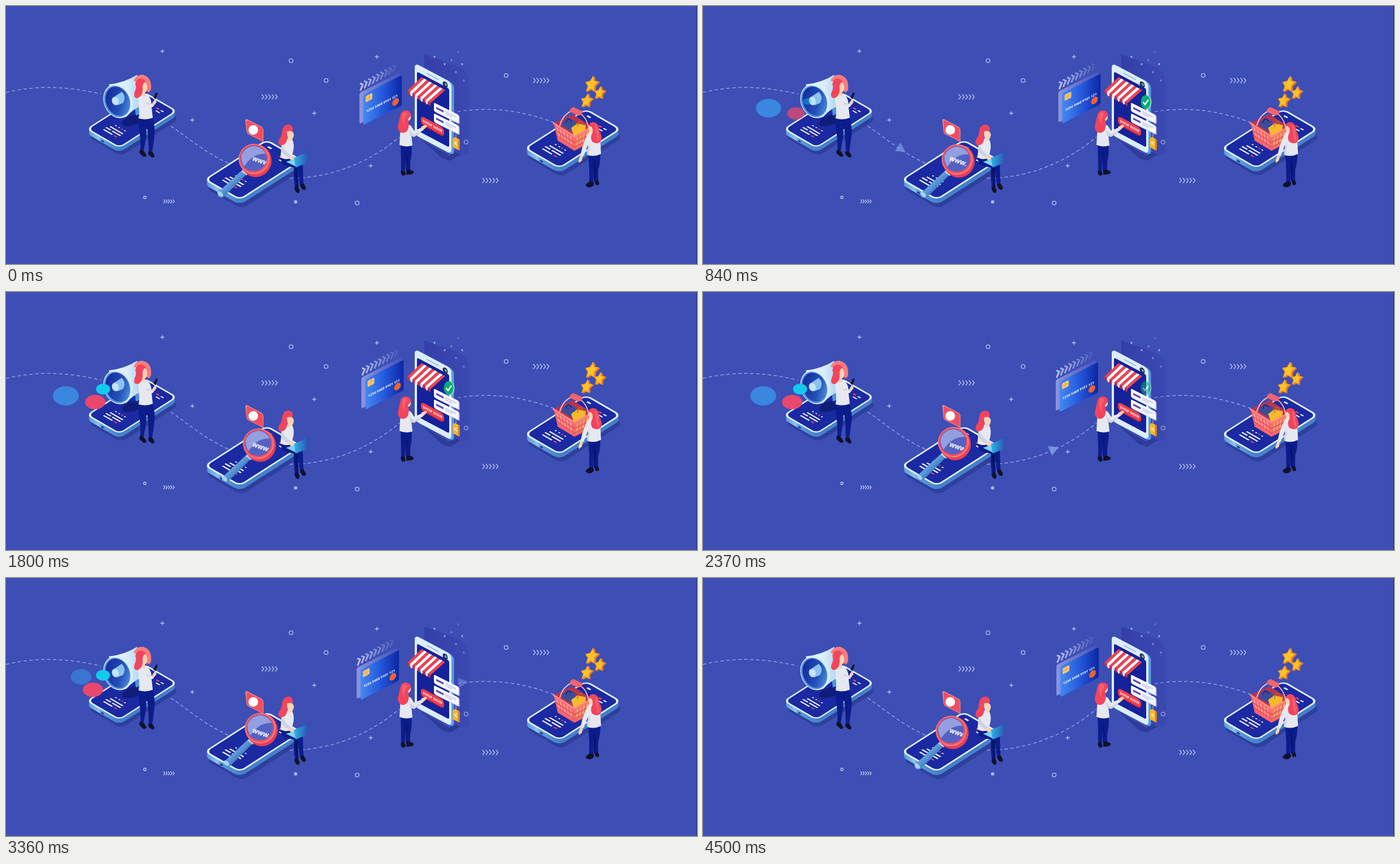
An HTML page for the animation above (4530 ms loop, 1224 by 457 pixels).

```html
<!DOCTYPE html>
<html lang="en">
<head>
<meta charset="utf-8">
<title>Online shopping journey</title>
<style>
html, body { margin: 0; width: 100%; height: 100%; overflow: hidden; background: #3d4eb5; }
svg { display: block; width: 100vw; height: 100vh; }
text { font-family: "Open Sans", Inter, sans-serif; font-weight: 700; fill: #fff; }
.hair { fill: #f2455d; }
.glow { fill: #f97c7c; }
.skin { fill: #fcd3b3; }
.shirt { fill: #e6e8ef; }
.fold { fill: #cfd3e2; }
.jeans { fill: #0b1c8c; }
.dim { fill: #081568; }
.shoe { fill: #10122b; }
.anim { animation: 4530ms linear infinite; }

.lens { animation-name: lens; animation-timing-function: ease-in-out; }
@keyframes lens {
  0%, 100% { transform: translate(0, 0); }
  24% { transform: translate(12px, 1px); }
  54% { transform: translate(4px, -5px); }
  76% { transform: translate(11px, -5px); }
}
.pay { animation-name: pay; animation-timing-function: ease-in-out; }
@keyframes pay {
  0%, 100% { transform: translate(0, 0); }
  29.5% { transform: translate(4.8px, -3.6px); }
  70% { transform: translate(-5px, 5.4px); }
}
.tick { animation-name: tick; }
@keyframes tick {
  0%, 9% { opacity: 0; }
  14%, 49.5% { opacity: 1; }
  56%, 100% { opacity: 0; }
}
.coin { animation-timing-function: ease-in-out; }
.c1 { animation-name: c1; }
.c2 { animation-name: c2; }
.c3 { animation-name: c3; }
@keyframes c1 {
  0%, 4% { transform: translate(190px, 169px) scale(.2); opacity: 0; animation-timing-function: ease-out; }
  11.3% { transform: translate(100px, 186px) scale(1); opacity: 1; }
  18.5% { transform: translate(116px, 181px) scale(.97); opacity: 1; }
  27% { transform: translate(105px, 184.5px) scale(1); }
  40% { transform: translate(106px, 184px) scale(1); }
  62% { transform: translate(107px, 184px) scale(1); opacity: 1; animation-timing-function: ease-in; }
  74.2% { transform: translate(133px, 175px) scale(.8); opacity: .7; animation-timing-function: linear; }
  79%, 100% { transform: translate(180px, 169px) scale(.3); opacity: 0; }
}
@keyframes c2 {
  0%, 15% { transform: translate(188px, 172px) scale(.3); opacity: 0; animation-timing-function: linear; }
  18.5% { transform: translate(165px, 190px) scale(.85); opacity: .75; animation-timing-function: ease-out; }
  22% { transform: translate(152px, 199px) scale(1); opacity: 1; }
  28% { transform: translate(160px, 193.5px) scale(1); }
  40%, 69% { transform: translate(158px, 195px) scale(1); }
  74.2% { transform: translate(154px, 198px) scale(1); opacity: 1; animation-timing-function: ease-in; }
  81%, 100% { transform: translate(186px, 171px) scale(.3); opacity: 0; }
}
@keyframes c3 {
  0%, 17% { transform: translate(190px, 168px) scale(.3); opacity: 0; animation-timing-function: linear; }
  18.5% { transform: translate(185px, 169px) scale(.6); opacity: .4; animation-timing-function: ease-out; }
  24% { transform: translate(168px, 174px) scale(1); opacity: 1; }
  31% { transform: translate(173px, 171.5px) scale(1); }
  40%, 73% { transform: translate(172px, 172px) scale(1); }
  78% { transform: translate(170px, 174px) scale(1); opacity: 1; animation-timing-function: ease-in; }
  89%, 100% { transform: translate(189px, 169px) scale(.4); opacity: 0; }
}
.arrow { fill: #7ea0e8; opacity: 0; offset-rotate: auto; }
.a1 { offset-path: path("M283 207C320 230 345 256 395 279"); animation-name: a1; }
.a2 { offset-path: path("M492 305C570 307 640 280 697 232"); animation-name: a2; }
.a3 { offset-path: path("M800 187C860 178 915 185 972 207"); animation-name: a3; }
@keyframes a1 {
  0%, 9.7% { offset-distance: 0%; opacity: 0; }
  13% { opacity: .85; }
  18% { opacity: .75; }
  24.1%, 100% { offset-distance: 100%; opacity: 0; }
}
@keyframes a2 {
  0%, 39.2% { offset-distance: 0%; opacity: 0; }
  43% { opacity: .85; }
  56% { opacity: .85; }
  61.2%, 100% { offset-distance: 100%; opacity: 0; }
}
@keyframes a3 {
  0%, 73.2% { offset-distance: 0%; opacity: 0; }
  75% { opacity: .85; }
  88.5% { opacity: .85; }
  93.6%, 100% { offset-distance: 100%; opacity: 0; }
}
</style>
</head>
<body>
<svg viewBox="0 0 1224 457" preserveAspectRatio="none">
<defs>
  <linearGradient id="edge"><stop offset="0" stop-color="#4b8fd6"/><stop offset=".36" stop-color="#8cc4ee"/><stop offset=".45" stop-color="#5c9fdf"/><stop offset="1" stop-color="#447fcb"/></linearGradient>
  <linearGradient id="cone"><stop offset="0" stop-color="#f1f9ff"/><stop offset=".55" stop-color="#d9edfb"/><stop offset="1" stop-color="#a9d2f1"/></linearGradient>
  <linearGradient id="mouth" x2="1" y2="1"><stop offset=".1" stop-color="#14289a"/><stop offset=".6" stop-color="#2450b8"/><stop offset="1" stop-color="#5fa3e6"/></linearGradient>
  <linearGradient id="bank"><stop offset="0" stop-color="#4489f2"/><stop offset=".5" stop-color="#2559dc"/><stop offset="1" stop-color="#0c26a4"/></linearGradient>
  <linearGradient id="ghost"><stop offset="0" stop-color="#a3a7ea" stop-opacity=".8"/><stop offset="1" stop-color="#8f93e0" stop-opacity=".1"/></linearGradient>
  <linearGradient id="pad"><stop offset="0" stop-color="#2d2f9c" stop-opacity=".5"/><stop offset="1" stop-color="#3436a4" stop-opacity=".2"/></linearGradient>
  <linearGradient id="laptop" x2="1"><stop offset="0" stop-color="#2fb4e6"/><stop offset="1" stop-color="#2a48ac"/></linearGradient>
  <linearGradient id="grip" x2="1" y2="1"><stop offset=".3" stop-color="#7fb8ea"/><stop offset=".6" stop-color="#3f7fc6"/></linearGradient>
  <clipPath id="glass"><ellipse class="anim lens" cx="439" cy="270" rx="23" ry="22.5"/></clipPath>
  <rect id="slab" width="60" height="110" rx="9" transform="matrix(.983 .567 .936 -.6 0 0)"/>
  <g id="phone">
    <use href="#slab" y="14" x="3" fill="#2f3f9c"/>
    <g fill="url(#edge)"><use href="#slab" y="7.5"/><use href="#slab" y="5.5"/><use href="#slab" y="3.5"/><use href="#slab" y="1.5"/></g>
    <use href="#slab" fill="#e4f3fd"/>
    <g transform="matrix(.983 .567 .936 -.6 0 0)">
      <rect x="2.400" y="2.600" width="55.200" height="104.800" rx="7" fill="#1b2aa2"/>
      <path d="M22 32h2.500M28 32h2.500M38 32h2.500" stroke="#fff" stroke-width="1.600"/>
      <path d="M33 32h2.500M36 15h5" stroke="#f2455d" stroke-width="1.900"/>
      <path d="M19 25.500h23M16 20.500h9M27.500 20.500h15M17 15h16" stroke="#f3f6ff" stroke-width="2.100"/>
      <path d="M35 96h5" stroke="#f2455d" stroke-width="2.400"/><path d="M43 96h5M39 91h7" stroke="#fff" stroke-width="1.800"/>
      <path d="M11 100.500h6" stroke="#e4f3fd" stroke-width="2.600"/>
    </g>
    <ellipse cx="29" cy="21.500" rx="3" ry="1.400" transform="rotate(30 29 21.500)" fill="#1b3a90"/>
  </g>
  <path id="tri" d="M10-1-7-10-7 8Z"/>
</defs>

<rect width="1224" height="457" fill="#3d4eb5"/>

<g fill="none" stroke="#909ee2" stroke-width="1.500" stroke-dasharray="6 4.500">
  <path d="M0 153C55 140 110 142 168 156"/>
  <path d="M283 207C320 230 345 256 395 279"/>
  <path d="M492 305C570 307 640 280 697 232"/>
  <path d="M800 187C860 178 915 185 972 207"/>
</g>
<g id="deco" fill="none" stroke="#b7c0ee" stroke-width="1.400"></g>
<circle cx="513" cy="347" r="3" fill="#a9b4ea"/>

<use href="#tri" class="anim arrow a1"/>
<use href="#tri" class="anim arrow a2"/>

<!-- megaphone scene -->
<use href="#phone" transform="translate(142 218)"/>
<path d="M206 205Q216 193 232 192L236 207Q220 216 206 211Z" fill="#101d78"/>
<path d="M227 172l10-3v22l-7 3Z" fill="#4f95dc"/>
<path d="M182 139Q210 136 232 122Q244 145 240 177Q227 181 212 197Z" fill="url(#cone)"/>
<g transform="rotate(-22 198 168)">
  <ellipse cx="198" cy="168.500" rx="25" ry="31" fill="#d8edfb"/>
  <ellipse cx="196.500" cy="168.500" rx="22.500" ry="28.500" fill="#4e93dd"/>
  <ellipse cx="197.500" cy="168.500" rx="20.500" ry="26.500" fill="url(#mouth)"/>
</g>
<path d="M190 162L205 152Q214 161 207 172L197 176Z" fill="#8ac3f0"/>
<ellipse cx="193.500" cy="168.500" rx="6" ry="7.500" transform="rotate(-20 193 168)" fill="#c4e4fa"/>
<ellipse class="anim coin c1" rx="23" ry="17" fill="#3a87df"/>
<ellipse class="anim coin c2" rx="18" ry="12.800" fill="#e8486c"/>
<ellipse class="anim coin c3" rx="12.500" ry="9.500" fill="#12cbec"/>

<path class="glow" d="M226 132Q232 120 243 122Q257 126 257 142Q258 151 252 153L240 140Z"/>
<path class="jeans" d="M235 196L259 196Q265 214 263 230L259 259L253 259L253 228L249 214L248 232L244 256L238 255Q239 234 235 214Z"/>
<path class="dim" d="M249 204l5 24-1 28-1-28Z"/>
<path class="shoe" d="M237 255q4-2 8 3l4 7q-3 4-7 1l-6-6ZM252 258h7l4 7q0 4-5 3l-6-5Z"/>
<path class="shirt" d="M234 160Q241 153 251 157Q259 166 258 180L260 198Q247 203 235 199Q237 188 235 176Z"/>
<path class="fold" d="M249 171l10 2 5-6 3 3-7 9-11-3Z"/>
<path class="shirt" d="M234 165q5-4 8 0l8 10 10-2 1 5-13 4q-12-7-14-17Z"/>
<path class="skin" d="M238 136Q248 131 250 142Q251 151 246 153L247 160L241 160Z"/>
<path class="hair" d="M232 131Q240 125 248 134Q241 136 242 146Q243 158 234 163Q224 164 228 152Q232 145 229 138Z"/>
<path class="skin" d="M259 172l4-6 4 1-3 6-5 4Z"/>
<path d="M261 162l5-9 3 1-4 11Z" fill="#11143a"/>

<!-- search scene -->
<use href="#phone" transform="translate(350.500 307.500) scale(1.080)"/>
<path d="M424 202q1-3 4-1l25 13q3 2 3 5v22l-9-5-18-9q-3-2-3-5Z" fill="#f98a8a"/>
<path d="M426 204q1-2 3-1l23 12q3 1 3 4v20l-8-4-17-9q-3-1-3-4Z" fill="#f04e5f"/>
<circle cx="438" cy="219.500" r="8.500" fill="#fff"/>
<g class="anim lens">
  <path d="M419 290l8 7-41 41q-6 3-10-1-3-4 2-9Z" fill="url(#grip)"/>
  <path d="M422 288l9 7-5 5-9-7Z" fill="#b9dcf5"/>
  <ellipse cx="379.500" cy="333" rx="3.500" ry="6" transform="rotate(-48 379.500 333)" fill="#a8d2f3"/>
  <ellipse cx="442.500" cy="274" rx="28" ry="29" fill="#e93f55"/>
  <ellipse cx="439.500" cy="271" rx="27.500" ry="27" fill="#fb7b7d"/>
  <ellipse cx="439" cy="270.500" rx="25.500" ry="25" fill="#ee4d60"/>
  <ellipse cx="439" cy="270" rx="23" ry="22.500" fill="#5561c2"/>
  <path d="M417 264Q424 249 440 248Q454 250 460 262Q438 260 422 284Q416 276 417 264Z" fill="#aab5ea" opacity=".75"/>
</g>
<g clip-path="url(#glass)"><text transform="matrix(.94 .33 -.26 .94 436 273)" font-size="12.500" font-style="italic">www.</text></g>

<path class="jeans" d="M487 269Q500 264 517 273Q527 276 526 288L527 317L521 319L517 291L518 322L512 324Q509 302 510 286Q494 284 488 278Z"/>
<path class="dim" d="M511 286l6 2 1 34-3 1Z"/>
<path class="shoe" d="M511 321l6-2 3 7q0 6-4 5-5-3-5-10ZM521 316l6-2 4 7q1 4-3 5-6-2-7-10Z"/>
<path class="shirt" d="M488 240Q496 232 507 236Q512 246 508 260L505 270Q493 273 486 268Q488 255 488 240Z"/>
<path class="fold" d="M490 247q5 12 15 17l-2 5q-12-4-16-13Z"/>
<path class="skin" d="M497 222Q508 218 510 228Q509 236 504 238L500 240Z"/>
<path class="skin" d="M503 265l8 2 2 5-8 1-5-4Z"/>
<path class="hair" d="M489 222Q491 210 501 210Q509 211 508 221L498 222Q497 228 498 236Q496 247 487 247Q480 246 484 236Q489 230 489 222Z"/>
<path d="M496 276l15-5 18 6-14 8Z" fill="#7fd5f5"/>
<path d="M510 269l28-12-7 22-18 7Z" fill="url(#laptop)"/>

<!-- payment scene -->
<path d="M741 86L803 108Q820 118 820 136V262L794 266L741 238Z" fill="url(#pad)"/>
<g id="dots" fill="#aab6ef"></g>
<use href="#tri" class="anim arrow a3"/>
<path d="M735 236l50 29 12-6 8 4-18 11-14-4Z" fill="#2f3b99"/>
<g transform="matrix(1 .53 0 1 724 101)">
  <g fill="#5a9de0"><rect x="4.500" width="65" height="127" rx="7"/><rect x="2.500" width="65" height="127" rx="7"/></g>
  <rect width="65" height="127" rx="7" fill="#dbedfb"/>
  <rect x="4" y="13" width="57" height="104" rx="3" fill="#15229a"/>
  <path d="M22 7h20" stroke="#9bb8dd" stroke-width="2" stroke-linecap="round"/>
  <ellipse cx="54" cy="9.500" rx="4.500" ry="5" fill="#20305e"/><ellipse cx="55" cy="9" rx="2" ry="2.200" fill="#6fae9f"/>
</g>
<g id="awning"></g>
<g transform="matrix(1 .55 0 1 735 194)">
  <rect y="2" width="41" height="14" rx="6" fill="#b92345"/>
  <rect width="41" height="14" rx="6" fill="#ee3f4d"/>
  <text x="20.500" y="9.400" font-size="6.200" text-anchor="middle">SHOP NOW</text>
</g>
<g id="notes"></g>
<path d="M797 226v8" stroke="#f5c75c"/>
<path d="M791 235l4-3 8 4v20l-12-6Z" fill="#f7b32c"/><path d="M801 236l3 1v18l-3 1Z" fill="#c98320"/>
<path d="M794 240l5 7M799 240l-5 5" stroke="#fff3d0" stroke-width="1.300"/>
<g class="anim tick">
  <ellipse cx="785.500" cy="170.500" rx="9" ry="12.500" fill="#8fe0c3"/><ellipse cx="784" cy="170" rx="8.500" ry="12" fill="#08ab73"/>
  <path d="M779.500 170l3.500 4.500 6-8.500" fill="none" stroke="#fff" stroke-width="2.300"/>
</g>
<g class="anim pay">
  <g id="sweep" fill="none" stroke="#c3caf2" stroke-width="3"></g>
  <rect width="72" height="55" rx="3" transform="matrix(1 -.51 0 1 626 154)" fill="url(#ghost)"/>
  <g transform="matrix(1 -.51 0 1 633 157)">
    <rect width="68" height="54" rx="3" fill="url(#bank)"/>
    <rect x="4" y="5" width="12" height="11" rx="2" fill="#f6c471"/><path d="M4 10.500h12M10 5v11" stroke="#d99f48" stroke-width=".7"/>
    <text x="5" y="34.500" font-size="6">1234 5468 9101 121</text>
    <circle cx="57" cy="42" r="6" fill="#f2622e"/>
  </g>
</g>

<path class="jeans" d="M699 244L718 244Q720 262 716 276L716 292L709 292L709 266L706 294L700 293Q700 270 699 244Z"/>
<path class="dim" d="M709 254l2 14-2 24-1-1Z"/>
<path class="shoe" d="M700 291l6 1 2 5q-2 5-6 3-4-3-2-9ZM709 290h7l6 3q1 4-4 5l-9 1Z"/>
<path class="shirt" d="M699 212Q708 206 717 212L723 221L737 215L739 220L724 230L718 228L720 247Q708 251 697 246Z"/>
<path class="fold" d="M714 220l9 8 10-6-1 4-9 6-7-2Z"/>
<path class="skin" d="M735 214l9-4 2 3-7 7ZM710 190q9-2 7 8-1 6-7 6Z"/>
<path class="hair" d="M698 196Q700 184 709 185Q718 186 717 195L712 200Q715 210 712 219Q707 227 699 224Q692 218 695 209Z"/>
<path class="glow" d="M703 189q6-3 8 3-7 8-5 18-7-8-3-21Z" opacity=".5"/>

<!-- basket scene -->
<use href="#phone" transform="translate(917.500 252) scale(1.066)"/>
<g id="stars"></g>
<path d="M970 207L1004 192L1037 213L1007 230Z" fill="#b93350"/>
<path d="M985 206l10-8 14 6 2 22-9-4-17-10Z" fill="#3b4c9c"/><path d="M992 207q3-12 10-3" fill="none" stroke="#18246e" stroke-width="1.500"/>
<path d="M1001 216l11-8 15 3-1 14-20 6Z" fill="#f7b92c"/><path d="M1012 214q3-18 11-3" fill="none" stroke="#b6721c" stroke-width="1.500"/>
<path d="M970 207L1007 230L1007 256L977 237Z" fill="#f7696f"/>
<path d="M1007 230L1037 214L1030 244L1007 256Z" fill="#ee7a55"/>
<g id="weave" stroke="#ffb3a0" stroke-width="1.600"></g>
<path d="M969 207L1007 231L1038 214" fill="none" stroke="#ff8a8a" stroke-width="3"/>
<path d="M977 237L1007 255L1030 243" fill="none" stroke="#f4606c" stroke-width="2.600"/>
<path d="M981 212Q986 192 1004 185M1013 188Q1029 196 1032 217" fill="none" stroke="#f9b9b2" stroke-width="1.900"/>
<path d="M1000 182l5-3 17 8-3 6-6 1-15-7Z" fill="#f4646c"/>

<path class="jeans" d="M1031 260L1053 260Q1053 278 1049 290L1049 311L1043 312L1041 284L1040 314L1033 314Q1034 288 1031 260Z"/>
<path class="dim" d="M1041 268l4 18-2 26-2-3Z"/>
<path class="shoe" d="M1033 311h7l2 4q-3 7-10 6-6-1-5-5ZM1043 309h6l2 6q-3 4-7 1Z"/>
<path class="shirt" d="M1034 221Q1044 214 1052 224L1054 262Q1042 268 1030 264L1031 246L1023 266L1018 263Q1022 240 1034 221Z"/>
<path class="fold" d="M1036 232q-1 16-6 20l-1 10 3 2q3-16 4-32Z"/>
<path class="skin" d="M1018 263l4 2-2 9-5 4-1-4ZM1033 212q-3 12 5 12l4-8Z"/>
<path class="hair" d="M1032 211Q1036 203 1045 207Q1051 212 1051 221Q1058 232 1053 241Q1045 246 1038 240Q1034 232 1039 224Q1041 214 1032 211Z"/>
<path class="glow" d="M1044 210q7 8 5 17 4 7 0 14-5-14-5-31Z" opacity=".5"/>

<rect x="1223" width="1" height="457" fill="#232c66"/>
</svg>
<script>
const range = n => [...Array(n).keys()];
const fill = (id, parts) => document.getElementById(id).innerHTML = parts.join('');
const line = (d, extra = '') => `<path d="${d}" ${extra}/>`;
const mix = (a, b, k) => a.map((v, i) => v + (b[i] - v) * k);

const plus = (x, y) => line(`M${x - 3.5} ${y}h7M${x} ${y - 3.5}v7`);
const ring = (x, y, r) => `<circle cx="${x}" cy="${y}" r="${r}"/>`;
const chevrons = (x, y, h, step) =>
  line(range(5).map(i => `M${x + i * step} ${y - h}l${h * .8} ${h}l${-h * .8} ${h}`).join(''));
fill('deco', [
  plus(277, 80), plus(330, 202), plus(546, 190), plus(657, 90), plus(646, 283),
  ring(505, 97, 3.4), ring(567, 132, 3.4), ring(246, 339, 2.2),
  ring(622, 349, 3.4), ring(815, 241, 3.4), ring(886, 123, 3.4),
  chevrons(453, 161, 4.5, 6), chevrons(279, 346, 3.2, 4.1),
  chevrons(844, 309, 4.5, 6), chevrons(934, 132, 4.5, 6),
]);

const dot = (x, y, o) => `<ellipse cx="${x}" cy="${y}" rx="1.6" ry="2" opacity="${o}"/>`;
fill('dots', [dot(759, 90, .9), dot(777, 103, .8), dot(789, 96, .5), dot(808, 103, .9),
  dot(801, 82, .3), dot(797, 117, .6), dot(811, 132, .5)]);

const stripes = 9;
fill('awning', range(stripes).map(i => {
  const at = k => [mix([736, 126], [778, 149], k), mix([711, 150], [752, 172], k)];
  const [a, b] = at(i / stripes), [c, d] = at((i + 1) / stripes);
  const color = i % 2 ? '#fff' : '#f0434f', lip = i % 2 ? '#dfe3f2' : '#c92d45';
  return line(`M${a}L${c}L${d}L${b}Z`, `fill="${color}"`) +
    line(`M${b}L${d}v3q-2 5 -4.600 -2.500Z`, `fill="${lip}"`);
}));

fill('notes', [171, 190].map(y => `<g transform="matrix(1 .5 0 1 758 ${y})">
  <rect x="1.500" y="1" width="44" height="15" rx="2" fill="#aab2e6"/><rect width="44" height="15" rx="2" fill="#f4f5fd"/>
  <path d="M4 7.500h13" stroke="#5a48b4" stroke-width="3.500"/><path d="M20 6h19M20 9.500h12" stroke="#b8bde6" stroke-width="1.500"/></g>`));

fill('sweep', range(9).map(i =>
  line(`M${627 + i * 7.2} ${137 - i * 4}l5 2l-4.500 11`, `opacity="${.9 - i * .095}"`)));

const star = (x, y, r, turn) => {
  const pts = range(10).map(i => {
    const a = i * Math.PI / 5 - Math.PI / 2, q = i % 2 ? r * .5 : r;
    return `${(q * Math.cos(a)).toFixed(1)},${(q * Math.sin(a)).toFixed(1)}`;
  }).join(' ');
  const shape = (dx, color, rim) => `<polygon points="${pts}" fill="${color}" stroke="${rim}" stroke-width="1.6" stroke-linejoin="round"
    transform="translate(${x + dx} ${y + dx * .4}) skewY(-14) rotate(${turn}) scale(.84 1)"/>`;
  return shape(2.5, '#e87a24', '#e87a24') + shape(0, '#ffc326', '#f6a028');
};
fill('stars', [star(1037, 139, 14, 12), star(1051, 154, 11, 12), star(1028, 168, 12, 12)]);

fill('weave', [
  ...range(5).map(i => line(`M${976 + i * 6} ${215 + i * 3.8}l${4.5 - i * .8} 18`)),
  ...range(4).map(i => line(`M${1012 + i * 6} ${232 - i * 3.2}l${-.5 - i * .9} 17`)),
  line('M973 220L1007 242L1034 228M975 229L1007 250L1032 237', 'fill="none" stroke="#e24c5c"'),
]);
</script>
</body>
</html>
```
